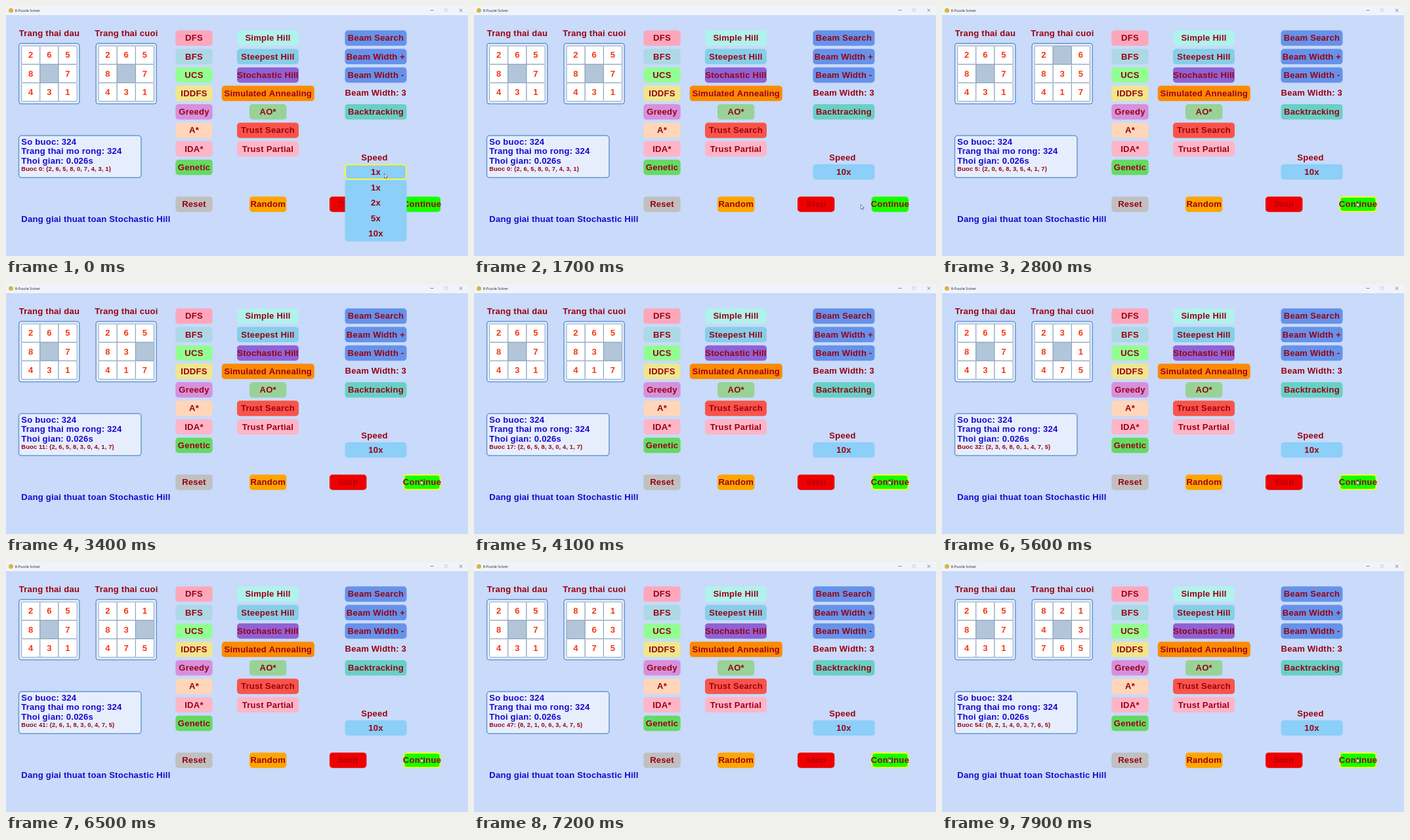
These frames come from a looping animation (704x382 px, 8000 ms). An HTML page with a canvas:

```html
<!DOCTYPE html>
<html lang="vi">
<head>
<meta charset="utf-8">
<title>8-Puzzle Solver</title>
<style>
  html, body { margin: 0; width: 704px; height: 382px; overflow: hidden; }
  canvas { display: block; }
</style>
</head>
<body>
<canvas id="stage" width="704" height="382"></canvas>
<script>
const ctx = document.getElementById('stage').getContext('2d');
const LOOP = 8000, TICK = 100;
const RED = '#990012', BLUE = '#1608cc', EDGE = '#6898d0', SKY = '#8ccff8';
const H = 23.5, CELL = 28.2;

const START = [2, 6, 5, 8, 0, 7, 4, 3, 1];
// Directions in which the blank travels, one per step
const MOVES = 'DRUUL' + 'RLRLRDUDUDUD' + 'ULDUDUDDRLRULRL' + 'UDURLRDUD' + 'LULDDUDUDRLRU';
const SHIFT = { U: -3, D: 3, L: -1, R: 1 };
const FIRST_STEP = 2233, STEP = 104, PICK = 800;

// label, x, centre y, width, fill, text colour
const BUTTONS = [
  ['DFS', 258.3, 49.1, 56.4, '#fda7bc'],
  ['BFS', 258.3, 77.3, 56.4, '#add8e6'],
  ['UCS', 258.3, 105.4, 56.4, '#92ff92'],
  ['IDDFS', 258.3, 133.6, 56.4, '#f0e68c'],
  ['Greedy', 258.3, 161.8, 56.4, '#d790dc'],
  ['A*', 258.3, 190, 56.4, '#ffd6b9'],
  ['IDA*', 258.3, 218.2, 56.4, '#ffb5c8'],
  ['Genetic', 258.3, 246.4, 56.4, '#64da64'],
  ['Simple Hill', 352, 49.1, 94, '#b0f2ec'],
  ['Steepest Hill', 352, 77.3, 94, '#87cee8'],
  ['Stochastic Hill', 352, 105.4, 94, '#9062d4'],
  ['Simulated Annealing', 328.8, 133.6, 141, '#fc8a04'],
  ['AO*', 371, 161.8, 56.4, '#98d296'],
  ['Trust Search', 352, 190, 94, '#f8544a'],
  ['Trust Partial', 352, 218.2, 94, '#ffb5c8'],
  ['Beam Search', 516.5, 49.1, 94, '#6692ea'],
  ['Beam Width +', 516.5, 77.3, 94, '#6692ea'],
  ['Beam Width -', 516.5, 105.4, 94, '#6692ea'],
  ['Backtracking', 516.5, 161.8, 94, '#68d0c6'],
  ['Reset', 258.3, 302.9, 56.4, '#c0c0c0'],
  ['Random', 371, 302.9, 56.4, '#ffa500'],
  ['Stop', 493, 302.9, 56.4, '#ee0000', '#b4000a'],
  ['Continue', 605.8, 302.9, 56.4, '#16ff00']
];

// time, x, y of the pointer tip
const POINTER = [
  [0, 576.5, 256], [150, 576.5, 258], [600, 570, 345],
  [1000, 570, 345], [1700, 589.5, 303.5], [1900, 632, 300], [LOOP, 632, 300]
];

function text(str, x, cy, color = RED, align = 'center', size = 13.1) {
  ctx.font = `bold ${size}px "Liberation Sans", Arial, sans-serif`;
  ctx.letterSpacing = `${size * 0.016}px`;
  ctx.textAlign = align;
  ctx.fillStyle = color;
  ctx.fillText(str, x, cy + size * 0.33);
}

function box(x, y, w, h, r, fill, stroke, line = 1.5) {
  ctx.beginPath();
  ctx.roundRect(x, y, w, h, r);
  if (fill) { ctx.fillStyle = fill; ctx.fill(); }
  if (stroke) { ctx.strokeStyle = stroke; ctx.lineWidth = line; ctx.stroke(); }
}

function button([label, x, cy, w, fill, color], tip) {
  const y = cy - H / 2;
  box(x, y, w, H, 4.7, fill);
  const over = tip && tip.x >= x && tip.x <= x + w && tip.y >= y && tip.y <= y + H;
  if (over) box(x + 0.6, y + 0.6, w - 1.2, H - 1.2, 4.5, null, '#fbfb30', 1.9);
  text(label, x + w / 2, cy, color);
}

function boardAt(step) {
  const board = [...START];
  for (const m of MOVES.slice(0, step)) {
    const from = board.indexOf(0), to = from + SHIFT[m];
    board[from] = board[to];
    board[to] = 0;
  }
  return board;
}

function grid(board, x, title) {
  text(title, x + 47, 41.3);
  box(x + 0.7, 57.2, 92.2, 92.4, 4, '#e6f0ff', EDGE);
  board.forEach((n, i) => {
    const cx = x + 4.6 + (i % 3) * CELL, cy = 61 + Math.floor(i / 3) * CELL;
    box(cx, cy, CELL, CELL, 1, n ? '#fff' : '#b3c5d9', '#86a0bc', 1);
    if (n) text(n, cx + CELL / 2, cy + CELL / 2, '#f03a14');
  });
}

function titleBar() {
  ctx.fillStyle = '#f0f4fa';
  ctx.fillRect(0, 0, 704, 14);
  ctx.fillStyle = '#dcb43c';
  ctx.beginPath();
  ctx.arc(7.5, 6.7, 3.5, 0, 7);
  ctx.fill();
  ctx.font = '5.5px "Open Sans", sans-serif';
  ctx.letterSpacing = '0px';
  ctx.textAlign = 'left';
  ctx.fillStyle = '#222';
  ctx.fillText('8-Puzzle Solver', 13.7, 8.6);
  ctx.lineWidth = 0.7;
  ctx.strokeStyle = '#555';
  ctx.stroke(new Path2D('M646.5 6.5h5M690.7 4.3l4.6 4.6m0-4.6l-4.6 4.6'));
  ctx.strokeStyle = '#c4c8ce';
  ctx.strokeRect(668.5, 4.5, 4, 4);
}

function pointerAt(t) {
  const i = POINTER.findIndex(p => p[0] > t);
  const [t0, x0, y0] = POINTER[i - 1], [t1, x1, y1] = POINTER[i];
  const k = (t - t0) / (t1 - t0);
  return { x: x0 + (x1 - x0) * k, y: y0 + (y1 - y0) * k };
}

function pointer({ x, y }) {
  ctx.save();
  ctx.translate(x, y);
  const arrow = new Path2D('M0 0v6.8l1.6-1.4 1.1 2.5 1.2-.5-1.1-2.5h2.1z');
  ctx.fillStyle = '#fff';
  ctx.fill(arrow);
  ctx.strokeStyle = '#333';
  ctx.lineWidth = 0.6;
  ctx.stroke(arrow);
  ctx.restore();
}

function speedMenu() {
  const top = 265.6;
  box(516.5, top, 94, H * 4, 4.7, SKY);
  ['1x', '2x', '5x', '10x'].forEach((s, i) => text(s, 563.5, top + H * (i + 0.5)));
}

function draw(t) {
  const step = Math.min(MOVES.length, Math.max(0, Math.floor((t - FIRST_STEP) / STEP)));
  const board = boardAt(step), tip = pointerAt(t), open = t < PICK;

  ctx.fillStyle = '#c9dafa';
  ctx.fillRect(0, 0, 704, 382);
  titleBar();
  grid(START, 19, 'Trang thai dau');
  grid(board, 136.4, 'Trang thai cuoi');

  box(19.5, 198, 186.5, 64.3, 4.5, '#e6eefe', EDGE);
  ['So buoc: 324', 'Trang thai mo rong: 324', 'Thoi gian: 0.026s'].forEach((line, i) =>
    text(line, 23.3, 208 + 14.1 * i, BLUE, 'left'));
  text(`Buoc ${step}: (${board.join(', ')})`, 23.3, 248.6, RED, 'left', 9.35);
  text('Dang giai thuat toan Stochastic Hill', 23.3, 325.4, BLUE, 'left');

  BUTTONS.forEach(b => button(b, tip));
  text('Beam Width: 3', 516.5, 132.8, RED, 'left');
  text('Speed', 561.5, 231.2);
  if (open) speedMenu();
  button([open ? '1x' : '10x', 516.5, 253.6, 94, SKY], tip);
  pointer(tip);
}

const begin = performance.now();
function frame() {
  const t = (performance.now() - begin) % LOOP;
  draw(Math.floor(t / TICK) * TICK);
  requestAnimationFrame(frame);
}
frame();
</script>
</body>
</html>
```
